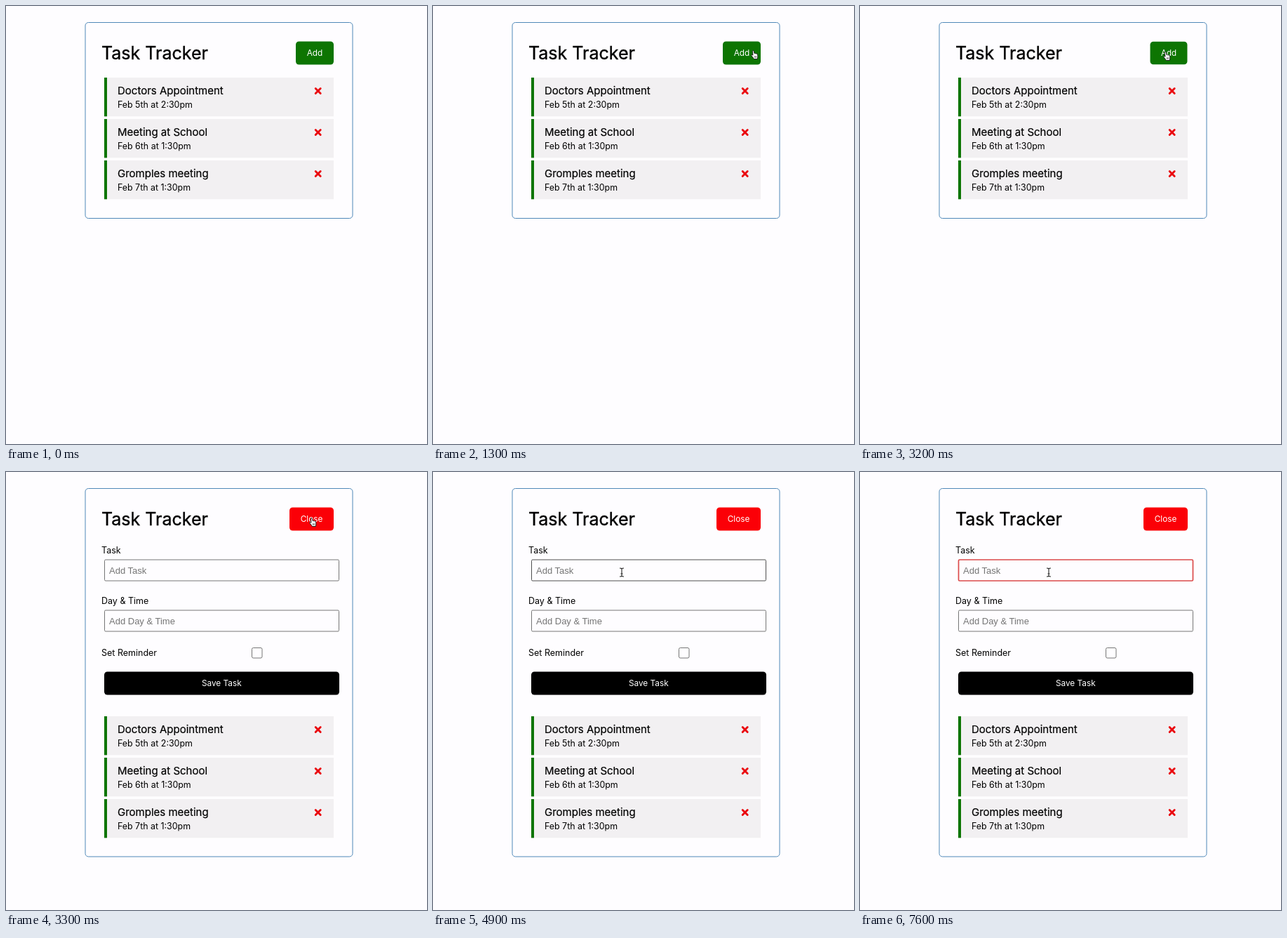
Recreate the animation shown at these times as an HTML page. Size 600 by 624 pixels, loop 8000 ms.

```html
<!DOCTYPE html>
<html lang="en">
<head>
<meta charset="utf-8">
<title>Task Tracker</title>
<style>
  html, body { margin: 0; width: 100%; height: 100%; overflow: hidden; background: #fefdff; }
  svg { display: block; width: 600px; height: 624px; }
  text { font-family: Inter, "Open Sans", sans-serif; font-size: 12.5px; fill: #000; }
  .heading { font-size: 25px; stroke: #000; stroke-width: .35px; }
  .name { font-size: 15px; stroke: #000; stroke-width: .2px; }
  .when { font-size: 12.4px; }
  .label { font-size: 11.8px; fill: #fff; text-anchor: middle; }
  .hint { font: 13px "Liberation Sans", Arial, sans-serif; fill: #757575; }
  .field { fill: #fefdff; stroke: #767676; }
  .cross { stroke: #ea0a10; stroke-width: 2.9; stroke-linecap: round; }
</style>
</head>
<body>
<svg viewBox="0 0 600 624">
  <rect id="card" x="113" y="23.5" width="381" rx="4.5" fill="none" stroke="#4f88b8"/>
  <text class="heading" x="136" y="76">Task Tracker</text>

  <g id="add">
    <rect x="413" y="50.5" width="54" height="33" rx="4.5" fill="#0d7502"/>
    <text class="label" x="440" y="71">Add</text>
  </g>

  <g id="form">
    <rect x="404" y="50.5" width="63" height="33" rx="4.5" fill="#fb0007"/>
    <text class="label" x="435.5" y="71">Close</text>
    <text x="136" y="116">Task</text>
    <rect id="taskField" class="field" x="140.5" y="125" width="334" height="30" rx="1.5"/>
    <text class="hint" x="147" y="145">Add Task</text>
    <rect id="caret" x="146.6" y="133" width="1" height="14.5"/>
    <text x="136" y="188">Day &amp; Time</text>
    <rect class="field" x="140.5" y="197" width="334" height="30" rx="1.5"/>
    <text class="hint" x="147" y="217">Add Day &amp; Time</text>
    <text x="136" y="262">Set Reminder</text>
    <rect class="field" x="350.5" y="250.5" width="14.5" height="14.5" rx="2"/>
    <rect x="140" y="284.5" width="335" height="33" rx="4.5"/>
    <text class="label" x="307.3" y="305">Save Task</text>
  </g>

  <g id="list"></g>

  <g id="arrow">
    <path d="M0 0V13L3 10.4L5 15L7.2 14L5.3 9.6H9.3Z" fill="#000" stroke="#fff" stroke-width=".9"/>
  </g>
  <g id="hand">
    <path d="M3 7.2L2.3 1.8Q2.2.5 3.2.5T4.4 1.7L5 4.6Q5.8 3.9 6.5 4.8Q7.4 4.2 8 5.2Q9.2 4.7 9.6 6Q10.4 9 9.4 12.5H4.4Q3.2 10.4 1 8Q.2 6.9 1.2 6.4Q2 6.2 3 7.2Z"
      fill="#fff" stroke="#111" stroke-width=".9" stroke-linejoin="round"/>
    <path d="M5.2 8.2V10.8M6.6 8.2V10.8M8 8.2V10.8" stroke="#222" stroke-width=".6"/>
  </g>
  <g id="beam" fill="none">
    <path d="M-3-6Q-.3-6 0-5Q.3-6 3-6M0-5V5M-3 6Q-.3 6 0 5Q.3 6 3 6M-1.5 2H1.5" stroke="#222" stroke-width="1.1"/>
  </g>
</svg>
<script>
  const LOOP = 8000, OPEN = 3300, FOCUS = 5100;
  const tasks = [
    ["Doctors Appointment", "Feb 5th at 2:30pm"],
    ["Meeting at School", "Feb 6th at 1:30pm"],
    ["Gromples meeting", "Feb 7th at 1:30pm"]
  ];
  // Pointer steps: time, shape, x, y
  const steps = [
    [0, "none", 0, 0],
    [400, "arrow", 552, 582], [500, "arrow", 546, 530], [600, "arrow", 531, 440],
    [700, "arrow", 513, 332], [800, "arrow", 497, 236], [900, "arrow", 484, 160],
    [1000, "arrow", 474, 110], [1100, "arrow", 467, 82], [1200, "hand", 460, 66],
    [1300, "hand", 453, 63], [1400, "hand", 448, 63], [1500, "hand", 443, 64],
    [1600, "hand", 438, 65], [1700, "hand", 434, 66], [1800, "hand", 432, 67],
    [1900, "hand", 431, 67], [2200, "hand", 432, 66], [2300, "hand", 432, 65],
    [4200, "hand", 431, 65], [4300, "hand", 430, 66],
    [4500, "hand", 419, 71], [4600, "arrow", 370, 100], [4700, "arrow", 318, 121],
    [4800, "beam", 282, 138], [4900, "beam", 269, 143]
  ];

  const $ = id => document.getElementById(id);
  const show = (id, on) => $(id).style.display = on ? "" : "none";

  $("list").innerHTML = tasks.map(([name, when], i) => `
    <g transform="translate(140 ${102 + i * 59})">
      <rect width="327" height="55.3" fill="#f2f0f2"/>
      <rect width="4" height="55.3" fill="#0d7502"/>
      <text class="name" x="19" y="24">${name}</text>
      <text class="when" x="19" y="43">${when}</text>
      <path class="cross" d="M301.2 15.5L308.2 22.5M308.2 15.5L301.2 22.5"/>
    </g>`).join("");

  function draw(t) {
    const open = t >= OPEN, focused = t >= FOCUS;
    const [, shape, x, y] = steps.findLast(s => s[0] <= t);

    $("card").setAttribute("height", open ? 524.5 : 279);
    $("list").setAttribute("transform", `translate(0 ${open ? 246 : 0})`);
    show("form", open);
    show("add", !open);
    const pressed = t >= 3200 && !open;
    $("add").setAttribute("transform", pressed ? "translate(440 67) scale(.98) translate(-440 -67)" : "");

    const field = $("taskField").style;
    field.stroke = focused ? "#dc4b4b" : shape === "beam" ? "#4f4f4f" : "";
    field.strokeWidth = focused ? 1.7 : 1;
    show("caret", focused && (t - FOCUS) % 1000 < 500);

    for (const id of ["arrow", "hand", "beam"]) {
      show(id, id === shape);
      $(id).setAttribute("transform", `translate(${x} ${y})`);
    }
  }

  const start = performance.now();
  function tick() {
    draw((performance.now() - start) % LOOP);
    requestAnimationFrame(tick);
  }
  tick();
</script>
</body>
</html>
```
